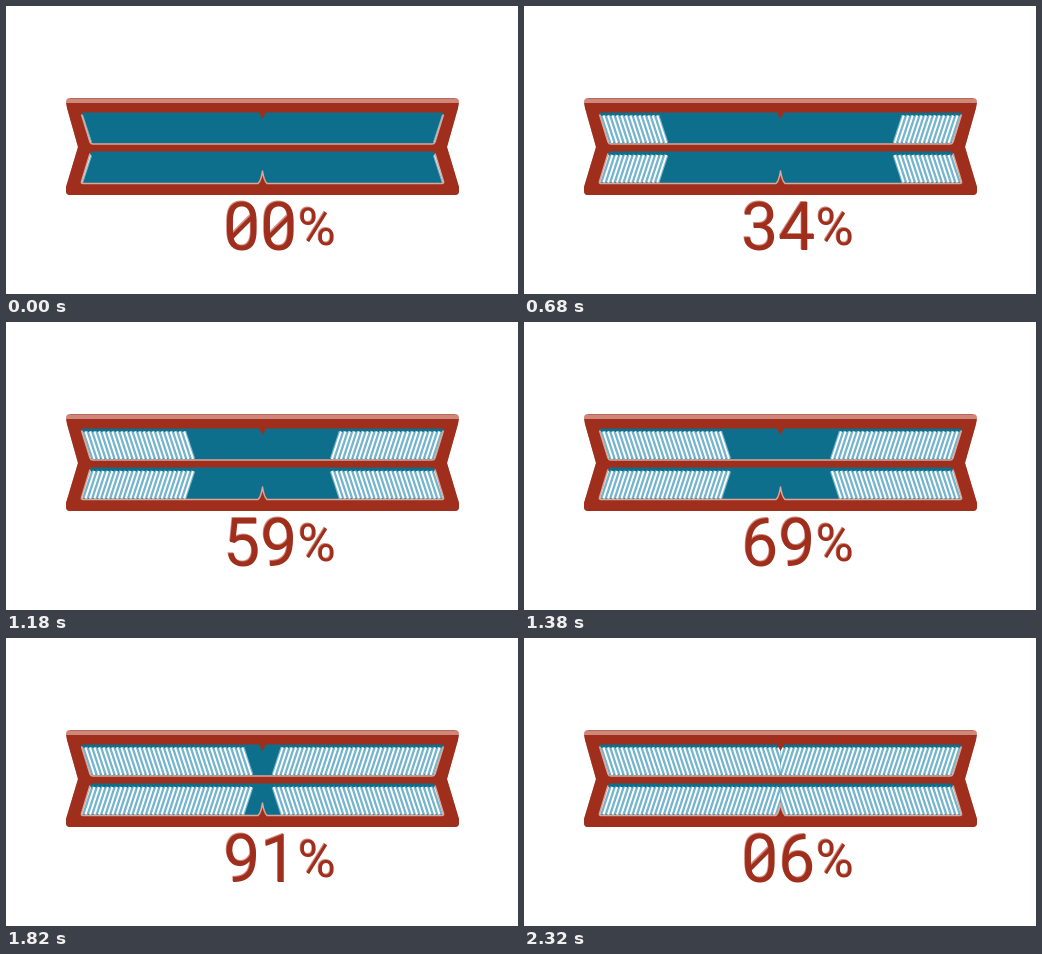
An HTML page that plays this animation: 512 by 288 pixels, repeating every 2340 ms.

```html
<!DOCTYPE html>
<html lang="en">
<head>
<meta charset="utf-8">
<title>Loading bar</title>
<style>
html, body { margin: 0; width: 100%; height: 100%; overflow: hidden; background: #fff; }
svg { display: block; width: 512px; height: 288px; }
text { font-family: Roboto, sans-serif; font-size: 66px; text-anchor: middle; }
.percent { font-size: 52px; }
.shine { fill: #d08c7f; stroke: #d08c7f; }
.body { fill: #a02e1c; stroke: #a02e1c; }
text.shine, text.body { stroke: none; }
.slash { stroke-width: 4.2; fill: none; }
.stripes { fill: none; }
</style>
</head>
<body>
<svg viewBox="0 0 512 288">
  <defs>
    <path id="frame" d="M64 92H449Q453 92 453 96L452 102 441 141 453 181V185Q453 189 449 189H64Q60 189 60 185V181L72 141 61 102 60 96Q60 92 64 92Z"/>
    <path id="top" d="M77 106.500H253L256.500 113 260 106.500H436Q438 106.500 437.500 108.500L429 136Q428.300 138 426 138H87Q84.700 138 84 136L75.500 108.500Q75 106.500 77 106.500Z"/>
    <path id="low" d="M87 145.500H426Q428.300 145.500 429 147.500L437.500 175.500Q438 177.500 436 177.500H261Q258 175 256.500 165 255 175 252 177.500H77Q75 177.500 75.500 175.500L84 147.500Q84.700 145.500 87 145.500Z"/>
    <clipPath id="inside"><use href="#top"/><use href="#low"/></clipPath>
    <clipPath id="half"><path d="M60 90H256.500V190H60Z"/></clipPath>
    <clipPath id="face"><path d="M58 97H455V190H58Z"/></clipPath>
    <g id="side" clip-path="url(#half)">
      <path class="stripes" stroke="#74b4cd" stroke-width="4.300"/>
      <path class="stripes" stroke="#fff" stroke-width="2"/>
    </g>
  </defs>

  <use href="#frame" fill="#cf8779"/>
  <use href="#frame" fill="#a02e1c" clip-path="url(#face)"/>
  <path d="M64 92.500H449" stroke="#b9695b"/>

  <g fill="#0d6f8b">
    <use href="#top"/>
    <use href="#low"/>
  </g>
  <g clip-path="url(#inside)">
    <use href="#side"/>
    <use href="#side" transform="matrix(-1 0 0 1 513 0)"/>
  </g>
  <g fill="none" stroke="#dba79b" stroke-width="1.500" stroke-linejoin="round">
    <path d="M75.500 108.500L84 136Q84.700 138 87 138H426Q428.300 138 429 136L437.500 108.500"/>
    <path d="M84 147.500L75.500 175.500Q75 177.500 77 177.500H252Q255 175 256.500 165 258 175 261 177.500H436Q438 177.500 437.500 175.500L429 147.500"/>
  </g>
  <g id="label"></g>
</svg>
<script>
const LOOP = 2340, STEP = 20, RESTART = 2200;
const FIRST = 84, PITCH = 4.48, LEAN = 9, PER_STRIPE = 2.5;
const CELLS = [200.5, 235.5, 272.5];
const LAYERS = [["shine", -.5, -1.2], ["body", .3, .3]];
const label = document.getElementById("label");
const stripes = document.querySelectorAll(".stripes");

function glyph(char, x, y, extra = "") {
  return LAYERS.map(([name, dx, dy]) => {
    const slash = char === "0"
      ? `<path class="slash ${name}" d="M${x - 10} ${y - 13}l20 -20"/>` : "";
    return `<g transform="translate(${dx} ${dy})"><text class="${name} ${extra}" x="${x}" y="${y}">${char}</text>${slash}</g>`;
  }).join("");
}

function stripePath(count) {
  let d = "";
  for (let i = 0; i < count; i++) {
    const x = FIRST + i * PITCH;
    d += `M${x - LEAN} 109.500L${x} 137M${x} 149L${x - LEAN} 176.500`;
  }
  return d;
}

let shown = "";
function draw(time) {
  const t = time % LOOP;
  const ended = t >= RESTART;
  const value = Math.min(100, Math.floor((ended ? t - RESTART : t) / STEP));
  const count = 1 + Math.floor((ended ? 100 : value) / PER_STRIPE);
  const key = value + ":" + count;
  if (key === shown) return;
  shown = key;
  const digits = String(value).padStart(2, "0");
  label.innerHTML = [...digits].map((c, i) =>
    glyph(c, CELLS[i + 3 - digits.length], 244)).join("") + glyph("%", 310.5, 239, "percent");
  const d = stripePath(count);
  stripes.forEach(path => path.setAttribute("d", d));
}

function tick() {
  draw(performance.now());
  requestAnimationFrame(tick);
}
tick();
</script>
</body>
</html>
```
